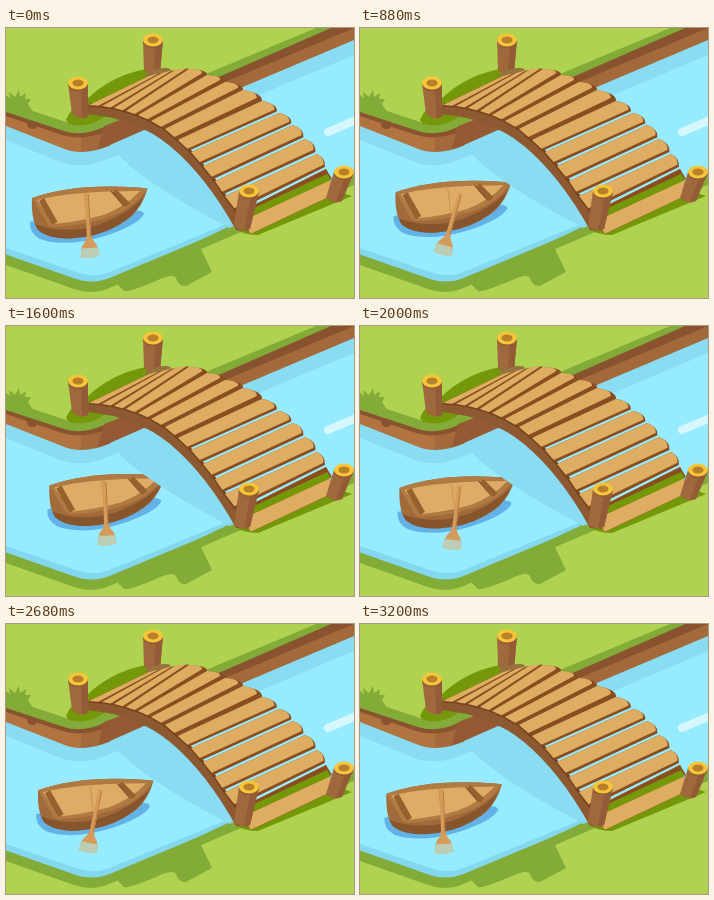
Write an HTML page with a canvas that moves like this. It is 348 px wide and 270 px high and loops after 3240 ms.

```html
<!DOCTYPE html>
<html lang="en">
<head>
<meta charset="utf-8">
<title>Boat by the bridge</title>
<style>
html, body { margin: 0; width: 100%; height: 100%; overflow: hidden; background: #afd350; }
canvas { display: block; width: 348px; height: 270px; }
</style>
</head>
<body>
<canvas id="stage" width="348" height="270"></canvas>
<script>
const ctx = document.getElementById('stage').getContext('2d');
const LOOP = 3240, STEP = 40;

const C = {
  grass: '#afd350', shade: '#82ac37', deep: '#75980a',
  water: '#96ebff', waterShade: '#89dcf2', shore: '#83d7ef',
  bankL: '#b1733f', bankR: '#a4693b', bankDark: '#8a5330',
  plank: '#dfad62', plankEdge: '#8a4d1f', arch: '#8d5931', archDark: '#75421e',
  post: '#a0683d', postDark: '#935c36', ring: '#f6c63a', core: '#b9802a',
  hull: '#a06a3a', hullDark: '#87552c', rim: '#b17a43', inside: '#dfac67',
  seat: '#96602f', oar: '#d49b5b', blade: '#bccdb5', boatShade: '#62b1e7'
};

function fill(d, color) {
  ctx.fillStyle = color;
  ctx.fill(new Path2D(d));
}

function line(d, color, width, cap = 'butt') {
  ctx.strokeStyle = color;
  ctx.lineWidth = width;
  ctx.lineCap = cap;
  ctx.stroke(new Path2D(d));
}

function oval(x, y, rx, ry, color, turn = 0) {
  ctx.fillStyle = color;
  ctx.beginPath();
  ctx.ellipse(x, y, rx, ry, turn, 0, Math.PI * 2);
  ctx.fill();
}

function land() {
  ctx.fillStyle = C.water;
  ctx.fillRect(0, 0, 348, 270);

  // far bank with its reflection
  fill('M0 90L58 112Q75 120 96 113L348 4V27L104 130Q75 143 52 133L0 112Z', C.waterShade);
  fill('M0 80L62 101Q75 106 92 101L75 124Q65 124 56 120L0 98Z', C.bankL);
  fill('M75 103L92 100L340 0H348V12L232 61L105 117Q90 124 75 124Z', C.bankR);
  fill('M0 75L60 97Q75 102 90 96L320 0H348L100 104Q75 113 56 107L0 88Z', C.bankDark);
  fill('M0 0H325L98 99Q76 109 58 103L0 84Z', C.shade);
  fill('M0 0H310L92 91Q76 99 60 94L0 74Z', C.grass);
  fill('M0 67L4 70L3 64L9 69L13 62L14 69L20 65L19 71L25 71L22 76L27 84L0 76Z', C.shade);
  oval(26, 97, 5, 4, C.bankDark, 0.3);
  oval(303, 14, 5, 4, C.bankDark, -0.4);

  // near shore
  fill('M0 220L70 244Q88 251 106 243L348 144V270H0Z', C.shore);
  fill('M0 226.5L70 251Q88 257 106 249L348 148V270H0Z', C.shade);
  fill('M0 237L68 261Q88 268 108 258L228 207L348 157V270H0Z', C.grass);
  fill('M108 253L118 263Q121 265 150 253Q167 245 170 250Q173 259 180 258L206 244L195 221L228 206L222 199Z', C.shade);
  line('M322 104L350 92', '#d7f7ff', 8, 'round');
}

function post(x, y, bx, by) {
  fill(`M${x - 10} ${y}L${bx - 8} ${by - 2}Q${bx} ${by + 5} ${bx + 8} ${by + 1}L${x + 10} ${y}Z`, C.post);
  fill(`M${x + 3} ${y}L${bx + 2} ${by + 2}L${bx + 8} ${by + 1}L${x + 10} ${y}Z`, C.postDark);
  oval(x, y + 1.5, 10, 6.8, C.postDark);
  oval(x, y, 10, 6.5, C.ring);
  oval(x, y, 5.6, 3.4, C.core);
}

// near and far ends of the seams between planks
const near = [[83, 77], [96, 78], [108, 80], [120, 83], [132, 87], [145, 93], [159, 101],
  [172, 112], [185, 124], [197, 138], [209, 153], [219, 168], [232, 185], [247, 209]];
const far = [[143, 48], [156, 45], [169, 42], [183, 41], [201, 47], [219, 54], [237, 62],
  [256, 73], [273, 85], [287, 97], [299, 111], [311, 126], [320, 141], [326, 172]];

const mix = (p, q, f) => [p[0] + (q[0] - p[0]) * f, p[1] + (q[1] - p[1]) * f];

function plank(i, part, color) {
  const a = near[i], b = far[i];
  const c = mix(b, far[i + 1], part), d = mix(a, near[i + 1], part);
  const bend = [Math.max(b[0], c[0]) + 1, (b[1] + c[1]) / 2 - 2];
  fill(`M${a}L${b}Q${bend} ${c}L${d}Z`, color);
}

function bridge() {
  fill('M98 98L92 121L105 117L140 102L120 90Z', '#955a34');
  fill('M104 117Q128 150 222 199L236 190Q180 120 138 102Z', C.waterShade);
  fill('M60 92Q64 80 80 72Q104 48 140 41L160 46L100 88Q82 101 63 96Z', C.deep);
  fill('M229 201L322 160L346 168L252 207Q238 207 229 201Z', C.deep);
  post(147, 12, 146, 44);
  oval(152, 45, 13, 4, '#94733f', -0.25);

  const edge = near.slice(0, 13).reverse().join('L');
  fill(`M80 86Q130 90 164 118Q200 148 230 202L244 203L${edge}L80 78Z`, C.arch);
  line(`M${edge}`, C.archDark, 3);
  for (let i = 0; i < 13; i++) {
    plank(i, i < 7 ? 1 : 0.87, C.plankEdge);
    plank(i, i < 12 ? 0.72 : 0.86, C.plank);
  }
  // open strip before the last board
  fill('M232 185L320 141L326 151L238 192Z', C.plankEdge);
  fill('M233 187L321 146L325 152L238 192Z', C.deep);

  post(72, 55, 74, 88);
  post(243, 163, 236, 200);
  post(338, 144, 328, 172);
}

function oar(swing) {
  ctx.save();
  ctx.translate(82.5 - swing, 198 + swing * 4.5);
  ctx.rotate((-3 + swing * 21) * Math.PI / 180);
  fill('M-2 -32Q0 -34 2 -32L2.2 10Q3 15 7 19L9 25H-9L-7 19Q-3 15 -2.2 10Z', C.oar);
  line('M1.5 -31V11', '#b87c40', 1);
  fill('M-8 22H8L10 30Q0 34 -10 31Z', C.blade);
  ctx.restore();
}

function boat() {
  fill('M24 194Q23 205 34 211Q60 220 99 208Q132 197 138 186Q137 181 124 183L40 190Z', C.boatShade);
  fill('M26 170Q60 158 106 158.5Q130 159 141.5 160.5Q137 177 126 188Q106 205 68 210Q46 212 32 202Q25 192 26 170Z', C.hull);
  fill('M29 196Q48 204 76 201Q112 194 138 169Q130 187 111 198Q92 209 65 210.5Q42 211 32 202Z', C.hullDark);
  fill('M26 170Q60 158 106 158.5Q130 159 141.5 160.5Q127 182 100 190Q75 198 47 199L42 197Z', C.rim);
  fill('M31 172Q66 163 134 163Q119 179 97 187Q76 193 49 196Z', C.inside);
  line('M35.5 171.5L49 195.5', C.seat, 6);
  line('M108 163L122 177', C.seat, 5.5);
  line('M105 163L118 178', C.hullDark, 1.2);
  line('M78 164L81 190', '#c99450', 1);
}

const fold = x => 1 - Math.abs(1 - 2 * x);

function draw(ms) {
  const t = Math.floor(ms % LOOP / STEP) * STEP;
  const drift = fold(t / LOOP);
  const swing = fold(t / (LOOP / 2) % 1);
  land();
  ctx.save();
  ctx.translate(17.6 * drift, -10.6 * drift);
  boat();
  oar(swing);
  ctx.restore();
  bridge();
}

let start;
function tick(now) {
  start ??= now;
  draw(now - start);
  requestAnimationFrame(tick);
}
draw(0);
requestAnimationFrame(tick);
</script>
</body>
</html>
```
